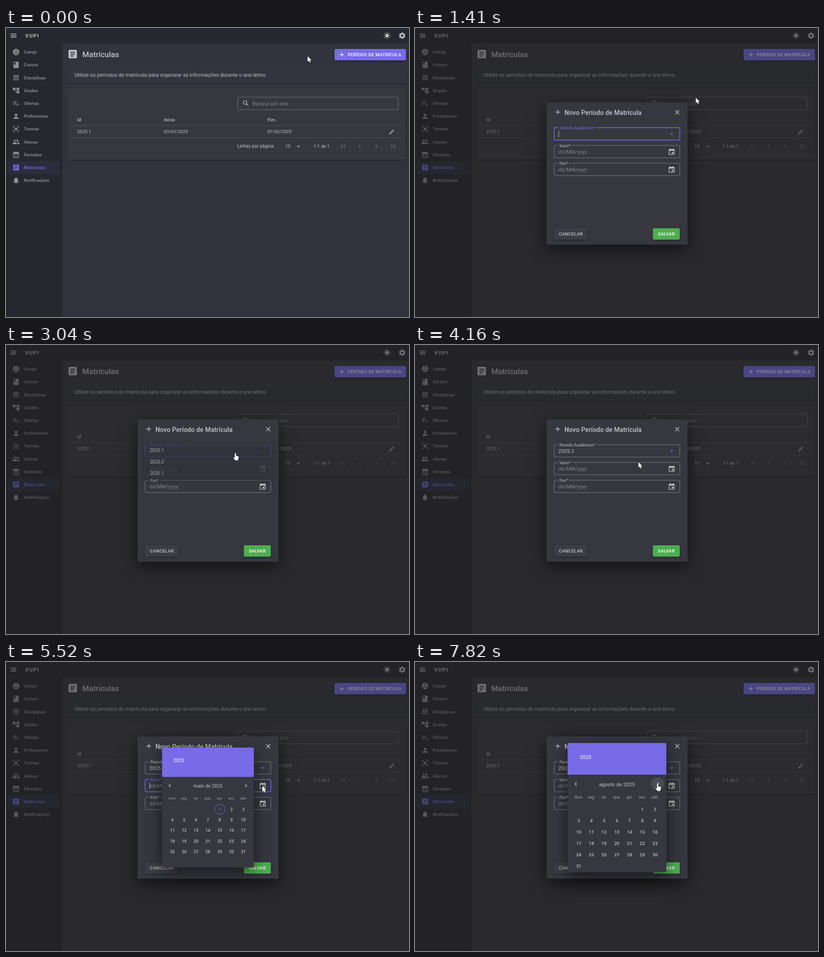
Animation of 882x635 px, one loop 8000 ms. Source, as an HTML page with a canvas:

```html
<!DOCTYPE html>
<html lang="pt-BR">
<head>
<meta charset="utf-8">
<title>Matrículas</title>
<style>
html, body { margin: 0; width: 100%; height: 100%; overflow: hidden; background: #32333d; }
canvas { display: block; }
</style>
</head>
<body>
<canvas id="stage" width="882" height="635"></canvas>
<script>
const ctx = document.getElementById('stage').getContext('2d');
const LOOP = 8000;
const PRIMARY = '#776be7', SURFACE = '#373740', DARK = '#27272f';
const white = a => `rgba(255,255,255,${a})`;
const TEXT = white(.7), MUTED = white(.5), FAINT = white(.26), LINE = white(.12);

const disc = (x, y, r) => `M${x - r} ${y}a${r} ${r} 0 1 0 ${2 * r} 0a${r} ${r} 0 1 0 ${-2 * r} 0z`;
const box = (x, y, w, h) => `M${x} ${y}h${w}v${h}h${-w}z`;
const calendarFrame = 'M19 4h-1V2h-2v2H8V2H6v2H5a2 2 0 0 0-2 2v14a2 2 0 0 0 2 2h14a2 2 0 0 0 2-2V6a2 2 0 0 0-2-2z';
const cells = [4, 10, 16];
const ICONS = {
  menu: box(3, 6, 18, 2) + box(3, 11, 18, 2) + box(3, 16, 18, 2),
  campus: disc(12, 12, 10) + disc(12, 8, 2.5) + disc(8, 15, 2.5) + disc(16, 15, 2.5),
  book: 'M18 2H6a2 2 0 0 0-2 2v16a2 2 0 0 0 2 2h12a2 2 0 0 0 2-2V4a2 2 0 0 0-2-2zM6 4h5v8l-2.5-1.5L6 12z',
  apps: cells.flatMap(x => cells.map(y => box(x, y, 4, 4))).join(''),
  tree: 'M22 11V3h-7v3H9V3H2v8h7V8h2v10h4v3h7v-8h-7v3h-2V8h2v3z',
  checklist: box(3, 6, 11, 2) + box(3, 10, 11, 2) + box(3, 14, 7, 2) +
    'M20.6 11.9l-4.3 4.3-2.1-2.1-1.4 1.4 3.5 3.5 5.7-5.7z',
  person: disc(12, 8, 4) + 'M12 14c-2.7 0-8 1.3-8 4v2h16v-2c0-2.7-5.3-4-8-4z',
  focus: disc(12, 12, 4) + 'M5 15H3v4a2 2 0 0 0 2 2h4v-2H5zM5 5h4V3H5a2 2 0 0 0-2 2v4h2zM19 3h-4v2h4v4h2V5a2 2 0 0 0-2-2zM19 19h-4v2h4a2 2 0 0 0 2-2v-4h-2z',
  group: disc(16, 8, 3) + disc(8, 8, 3) + 'M8 13c-2.3 0-7 1.2-7 3.5V19h14v-2.5C15 14.2 10.3 13 8 13zM16 13l-1 .1c1.2.8 2 1.9 2 3.4V19h6v-2.5c0-2.3-4.7-3.5-7-3.5z',
  month: calendarFrame + box(5, 10, 14, 10) +
    [7, 11, 15].map(x => box(x, 12, 2, 2) + box(x, 16, 2, 2)).join(''),
  event: calendarFrame + box(5, 9, 14, 11) + box(12, 13, 5, 5),
  article: 'M19 3H5a2 2 0 0 0-2 2v14a2 2 0 0 0 2 2h14a2 2 0 0 0 2-2V5a2 2 0 0 0-2-2z' +
    box(7, 7, 10, 2) + box(7, 11, 10, 2) + box(7, 15, 7, 2),
  bell: 'M12 22a2 2 0 0 0 2-2h-4a2 2 0 0 0 2 2zM18 16v-5c0-3.1-1.6-5.6-4.5-6.3V4a1.5 1.5 0 0 0-3 0v.7C7.6 5.4 6 7.9 6 11v5l-2 2v1h16v-1z',
  plus: 'M19 13h-6v6h-2v-6H5v-2h6V5h2v6h6z',
  close: 'M19 6.4L17.6 5 12 10.6 6.4 5 5 6.4 10.6 12 5 17.6 6.4 19 12 13.4 17.6 19 19 17.6 13.4 12z',
  search: disc(9.5, 9.5, 6.5) + disc(9.5, 9.5, 4.5) + 'M13.7 14.4l.3.3v.8l5 5 1.5-1.5-5-5h-.8l-.3-.3z',
  edit: 'M14.1 9l.9.9L5.9 19H5v-.9zM17.7 3q-.4 0-.7.3l-1.9 1.8 3.8 3.8 1.8-1.9q.6-.7 0-1.4l-2.3-2.3q-.3-.3-.7-.3zM14.1 6.2L3 17.3V21h3.8L17.8 9.9z',
  down: 'M7 10l5 5 5-5z',
  up: 'M7 14l5-5 5 5z',
  left: 'M15.4 7.4L14 6l-6 6 6 6 1.4-1.4L10.8 12z',
  right: 'M10 6L8.6 7.4 13.2 12l-4.6 4.6L10 18l6-6z',
  first: box(6, 6, 2, 12) + 'M18.4 16.6L13.8 12l4.6-4.6L17 6l-6 6 6 6z',
  last: box(16, 6, 2, 12) + 'M5.6 7.4L10.2 12l-4.6 4.6L7 18l6-6-6-6z'
};
for (const name in ICONS) ICONS[name] = new Path2D(ICONS[name]);
const ARROW = new Path2D('M0 0V12.2L2.8 9.6 4.8 14 6.9 13 5 8.8H8.7z');
const HAND = new Path2D('M-1.4 1a1.4 1.4 0 0 1 2.8 0V5.3l4.6 1q1.5.5 1.3 2.2L6.6 12l-.9 3.4H-.4L-4 10.6q-.8-1.6.8-1.9L-1.4 10z');

const clamp = v => Math.max(0, Math.min(1, v));
const ramp = (t, start, length) => clamp((t - start) / length);
const easeOut = p => Math.sin(p * Math.PI / 2);
const easeInOut = p => p * p * (3 - 2 * p);

function text(s, x, y, size, color, weight = 400, spacing = 0, align = 'left') {
  ctx.font = `${weight} ${size}px Roboto, sans-serif`;
  ctx.letterSpacing = spacing + 'px';
  ctx.textAlign = align;
  ctx.fillStyle = color;
  ctx.fillText(s, x, y + size * .355);
}
function icon(name, x, y, color, size = 16.9) {
  ctx.save();
  ctx.translate(x - size / 2, y - size / 2);
  ctx.scale(size / 24, size / 24);
  ctx.fillStyle = color;
  ctx.fill(ICONS[name], 'evenodd');
  ctx.restore();
}
function panel(x, y, w, h, color, shadow = 0, alpha = .4, radius = 3) {
  ctx.save();
  ctx.shadowColor = `rgba(0,0,0,${alpha})`;
  ctx.shadowBlur = shadow;
  ctx.shadowOffsetY = shadow * .3;
  ctx.fillStyle = color;
  ctx.beginPath();
  ctx.roundRect(x, y, w, h, radius);
  ctx.fill();
  ctx.restore();
}
function circle(x, y, r, color, stroked) {
  ctx.beginPath();
  ctx.arc(x, y, r, 0, Math.PI * 2);
  ctx[stroked ? 'strokeStyle' : 'fillStyle'] = color;
  stroked ? ctx.stroke() : ctx.fill();
}
function outline(x, y, w, h, color, width = 1) {
  ctx.strokeStyle = color;
  ctx.lineWidth = width;
  ctx.beginPath();
  ctx.roundRect(x, y, w, h, 3);
  ctx.stroke();
}
function rays(x, y, count, from, to, width) {
  ctx.lineWidth = width;
  ctx.beginPath();
  for (let i = 0; i < count; i++) {
    const a = i * 2 * Math.PI / count, s = Math.sin(a), c = Math.cos(a);
    ctx.moveTo(x + s * from, y - c * from);
    ctx.lineTo(x + s * to, y - c * to);
  }
  ctx.stroke();
}
function scaled(x, y, k, draw) {
  ctx.save();
  ctx.translate(x, y);
  ctx.scale(k, k);
  ctx.translate(-x, -y);
  draw();
  ctx.restore();
}

const MENU = [['campus', 'Campi'], ['book', 'Cursos'], ['apps', 'Disciplinas'], ['tree', 'Grades'],
  ['checklist', 'Ofertas'], ['person', 'Professores'], ['focus', 'Turmas'], ['group', 'Alunos'],
  ['month', 'Períodos'], ['article', 'Matrículas'], ['bell', 'Notificações']];

function drawShell() {
  ctx.fillStyle = '#32333d';
  ctx.fillRect(0, 0, 882, 635);
  panel(0, 0, 123, 635, DARK, 3, .3, 0);
  panel(0, 0, 882, 33, DARK, 3, .3, 0);
  ctx.fillStyle = DARK;
  ctx.fillRect(0, 28, 122, 10);
  icon('menu', 16.5, 16.8, TEXT);
  text('VUPI', 42, 17, 11.3, TEXT, 700, 1.5);
  ctx.strokeStyle = '#bebec0';
  rays(834, 16.8, 8, 5.4, 7.7, 1.4);
  circle(834, 16.8, 4, '#bebec0');
  rays(867, 16.8, 6, 4, 6.8, 4);
  ctx.lineWidth = 3;
  circle(867, 16.8, 4, '#bebec0', true);

  panel(4, 293, 113, 28, 'rgba(119,107,231,.08)');
  MENU.forEach(([name, label], i) => {
    const y = 52.8 + 28.2 * i, color = name === 'article' ? PRIMARY : MUTED;
    icon(name, 22, y, color);
    text(label, 39, y, 9.8, color, 500);
  });
}

function drawPage(t) {
  icon('article', 146, 57.3, TEXT, 24.5);
  text('Matrículas', 167, 58.3, 16.9, TEXT, 500);
  panel(719, 46, 156.5, 25, t > 320 && t < 880 ? '#5a4be2' : PRIMARY, 4);
  const ripple = ramp(t, 720, 300);
  if (ripple > 0 && ripple < 1) {
    ctx.save();
    ctx.beginPath();
    ctx.roundRect(719, 46, 156.5, 25, 3);
    ctx.clip();
    circle(757, 59, 120 * ripple, white(.15 * (1 - ripple)));
    ctx.restore();
  }
  icon('plus', 735, 58.5, '#fff', 15.5);
  text('PERÍODO DE MATRÍCULA', 748, 58.6, 9.8, '#fff', 500, .28);

  panel(134, 86, 741.5, 35.5, '#33343d', 3);
  text('Utilize os períodos de matrícula para organizar as informações durante o ano letivo.',
    150, 102.7, 11.37, TEXT);

  panel(134, 132, 741.5, 157.5, SURFACE, 3);
  outline(507.5, 152, 351, 27.5, white(.3));
  icon('search', 525, 165.5, TEXT);
  text('Busque por ano', 539.5, 166, 11.2, white(.38));
  ['Id', 'Início', 'Fim'].forEach((s, i) => text(s, [156, 345.5, 572.5][i], 201.4, 9.95, TEXT, 500));
  ['2025.1', '03/03/2025', '07/03/2025'].forEach((s, i) => text(s, [155.5, 345.3, 572][i], 227.8, 9.95, TEXT));
  ctx.fillStyle = LINE;
  ctx.fillRect(144, 214, 720, 1);
  ctx.fillRect(144, 241, 720, 1);
  icon('edit', 844, 228.5, '#adadb1', 14);
  text('Linhas por página:', 506, 259.8, 10, TEXT);
  text('10', 611.5, 259.8, 9.95, TEXT);
  icon('down', 640, 260.5, '#adadb1');
  text('1-1 de 1', 673, 259.8, 9.95, TEXT);
  ['first', 'left', 'right', 'last'].forEach((name, i) => icon(name, 738.5 + 36 * i, 260, FAINT));
}

function drawField(y, label, gap, value, name, focused, hovered) {
  const w = focused ? 1.5 : 1;
  ctx.save();
  ctx.beginPath();
  ctx.rect(300, y - 4, 284, 40);
  ctx.rect(313.5, y - 2, gap, 4);
  ctx.clip('evenodd');
  outline(304.5, y, 275, 27.2, focused ? PRIMARY : white(hovered ? .6 : .36), w);
  ctx.restore();
  text(label, 316.3, y + .5, 8.5, focused ? PRIMARY : TEXT);
  if (value) text(value, 313.8, y + 14, 11.28, TEXT);
  else if (name === 'event') text('dd/MM/yyyy', 313.8, y + 14, 11.2, white(.38));
  icon(name, 561.8, y + 13.8, name === 'event' ? TEXT : PRIMARY);
  if (focused) {
    ctx.fillStyle = TEXT;
    ctx.fillRect(314, y + 7, 1, 14);
  }
}

function drawDialog(t) {
  panel(288, 163.5, 308.5, 312.5, SURFACE, 36, .55);
  icon('plus', 312.5, 184.8, TEXT);
  text('Novo Período de Matrícula', 327, 185.5, 14.2, TEXT, 500);
  icon('close', 574, 185, TEXT);
  const chosen = t >= 3920, open = t >= 2900 && !chosen;
  drawField(219, 'Período Acadêmico*', 83, chosen ? '2025.2' : '', open ? 'up' : 'down', !chosen);
  drawField(258, 'Início*', 29, '', 'event', t >= 5380 && t < CLICKS[0], t > 4540 && t < 5380);
  drawField(297, 'Fim*', 23, '', 'event');
  panel(304, 440, 74, 25, '#3d3d45', 4);
  text('CANCELAR', 315, 452.3, 9.8, TEXT, 500, .28);
  panel(520.5, 440, 59, 25, '#4caf50', 4);
  text('SALVAR', 550, 452.3, 9.8, '#fff', 500, .28, 'center');
}

function drawOptions(t) {
  const alpha = easeOut(ramp(t, 2900, 260)) * (1 - easeInOut(ramp(t, 3920, 220)));
  if (!alpha) return;
  ctx.save();
  ctx.globalAlpha = alpha;
  panel(304, 217.5, 276, 76, SURFACE, 10);
  if (t > 3160) {
    ctx.fillStyle = white(.04);
    ctx.fillRect(304, t < 3440 ? 218.5 : 243.5, 276, 25);
  }
  ['2025.1', '2025.2', '2026.1'].forEach((s, i) => text(s, 315, 231.3 + 25 * i, 10, white(.8)));
  ctx.restore();
}

const CLICKS = [7170, 7400, 7640];
const MONTHS = ['maio', 'junho', 'julho', 'agosto'];
const WEEKDAYS = ['dom.', 'seg.', 'ter.', 'qua.', 'qui.', 'sex.', 'sáb.'];

function drawCalendar(t) {
  const step = CLICKS.filter(c => t >= c).length;
  const offset = new Date(2025, 4 + step, 1).getDay();
  const length = new Date(2025, 5 + step, 0).getDate();
  const column = i => 358.3 + 27.85 * i;
  panel(334, 178, 216, 283.5, SURFACE, 36, .58);
  panel(334, 178, 216, 69.5, PRIMARY, 0, 0, [3, 3, 0, 0]);
  text('2025', 360.5, 208.5, 11.3, '#fff');
  if (t >= 7050) circle(531, 268, 14, white(.1));
  icon('left', 352, 268, TEXT);
  icon('right', 531.7, 268, TEXT);
  text(`${MONTHS[step]} de 2025`, 442, 268.6, 11.35, TEXT, 400, 0, 'center');
  WEEKDAYS.forEach((s, i) => text(s, column(i), 297.3, 8.6, white(.55), 400, 0, 'center'));
  for (let day = 1; day <= length; day++) {
    const cell = day - 1 + offset, x = column(cell % 7), y = 324 + 25 * Math.floor(cell / 7);
    const today = !step && day === 1;
    if (today) {
      ctx.lineWidth = 1;
      circle(x, y, 12.2, PRIMARY, true);
    }
    text(day, x, y, 9.8, today ? PRIMARY : TEXT, 500, .1, 'center');
  }
}

// Pointer stops: time, x, y
const PATH = [[40, 660, 62], [560, 757, 59], [1060, 757, 59], [1410, 615, 153], [1490, 579, 161],
  [1730, 537, 168], [2440, 537, 168], [2720, 502, 238], [3300, 502, 238], [3660, 489, 257.5],
  [4460, 489, 257.5], [5240, 561, 273], [5580, 561, 273], [6140, 511, 331], [6490, 513, 332],
  [6970, 528, 273], [7050, 531, 268], [8000, 531, 268]];
const HAND_TIMES = [[320, 880], [2620, 3960], [4540, 5480], [7030, 8000]];

function drawPointer(t) {
  const i = Math.max(1, PATH.findIndex(p => p[0] > t));
  const [t0, x0, y0] = PATH[i - 1], [t1, x1, y1] = PATH[i];
  const p = ramp(t, t0, t1 - t0);
  const hand = HAND_TIMES.some(([from, to]) => t >= from && t < to);
  ctx.save();
  ctx.translate(x0 + (x1 - x0) * p, y0 + (y1 - y0) * p);
  ctx.fillStyle = '#fff';
  ctx.strokeStyle = '#000';
  ctx.lineWidth = 1;
  ctx.stroke(hand ? HAND : ARROW);
  ctx.fill(hand ? HAND : ARROW);
  ctx.restore();
}

function draw(t) {
  drawShell();
  drawPage(t);
  const shown = ramp(t, 840, 150);
  if (shown) {
    ctx.fillStyle = `rgba(33,33,33,${.5 * shown})`;
    ctx.fillRect(0, 0, 882, 635);
    scaled(442, 320, .75 + .25 * easeOut(ramp(t, 840, 100)), () => drawDialog(t));
    drawOptions(t);
  }
  if (t >= 5470) scaled(442, 320, .75 + .25 * easeOut(ramp(t, 5470, 100)), () => drawCalendar(t));
  drawPointer(t);
}

const start = performance.now();
(function tick() {
  draw((performance.now() - start) % LOOP);
  requestAnimationFrame(tick);
})();
</script>
</body>
</html>
```
